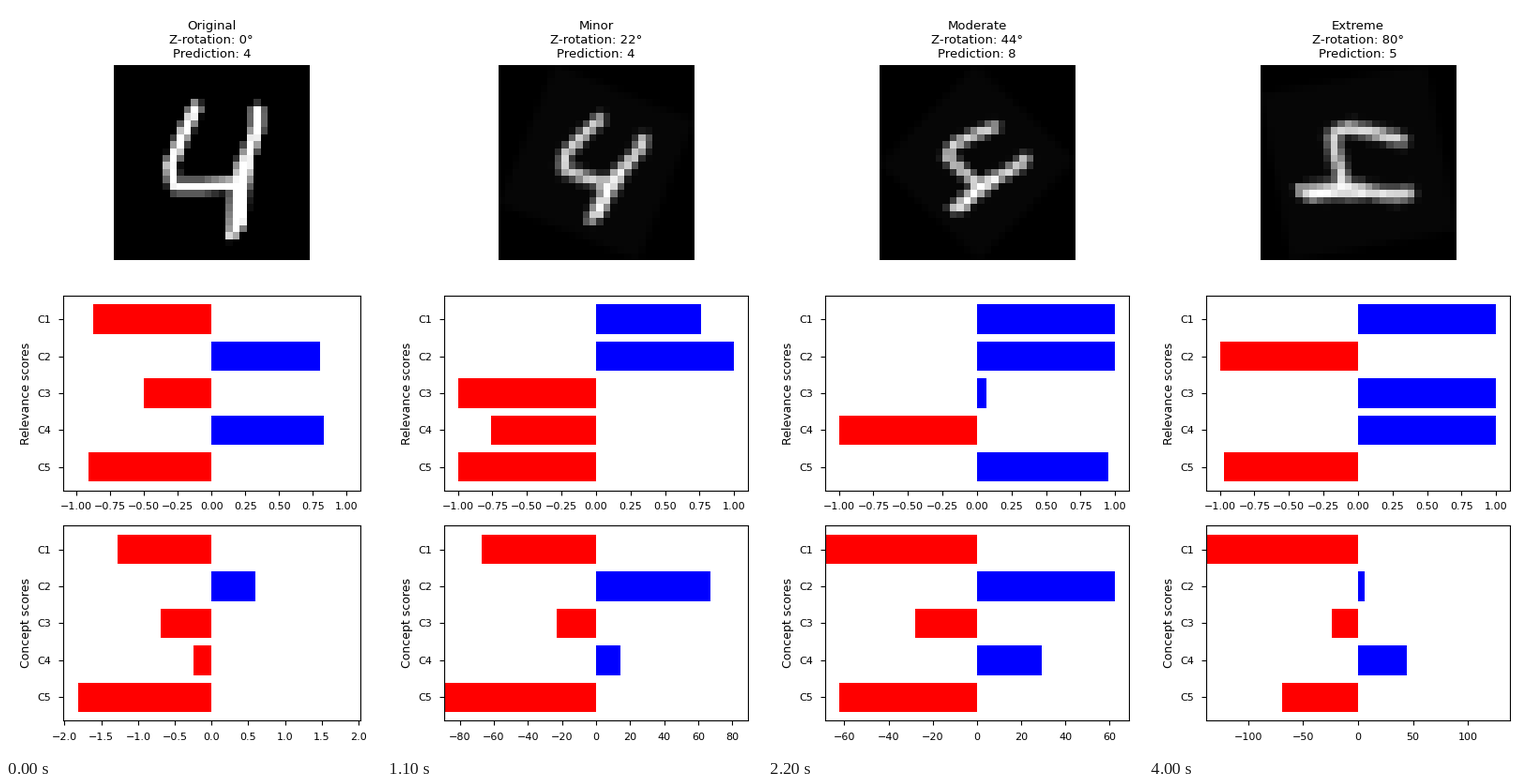
Write a matplotlib script that moves like this. It is 400 px wide and 800 px high and loops after 4100 ms.

```python
import numpy as np
import matplotlib.pyplot as plt
from matplotlib.animation import FuncAnimation

FRAMES, INTERVAL, STEP = 41, 100, 2
N = 28
SUB = 2
PAPER = 0.024
NAMES = [f"C{k}" for k in range(1, 6)]

# Pen strokes on the pixel grid: half width, then (column, row) points
STROKES = [
    (0.85, [(11.1, 5.8), (9.2, 10), (7.6, 14), (8, 16.3)]),
    (0.85, [(8.4, 17), (12, 17), (17, 16.6)]),
    (0.9, [(20, 6.2), (20, 8.5), (18.2, 14)]),
    (1.25, [(18.2, 14), (17.4, 18), (17.2, 22)]),
    (0.8, [(17.2, 22), (16.4, 23.8)]),
]


def segment_distance(x, y, a, b):
    dx, dy = b[0] - a[0], b[1] - a[1]
    t = np.clip(((x - a[0]) * dx + (y - a[1]) * dy) / (dx * dx + dy * dy), 0, 1)
    return np.hypot(x - a[0] - t * dx, y - a[1] - t * dy)


def draw_digit():
    y, x = np.mgrid[:N, :N]
    img = np.zeros((N, N))
    for half, pts in STROKES:
        for a, b in zip(pts, pts[1:]):
            img = np.maximum(img, half + 0.5 - segment_distance(x, y, a, b))
    return np.clip(img, 0, 1)


DIGIT = draw_digit()


def bilinear(img, x, y):
    """Sample img at fractional positions; everything outside is black."""
    padded = np.pad(img, 1)
    x = np.clip(x + 1, 0, N + 0.999)
    y = np.clip(y + 1, 0, N + 0.999)
    i, j = x.astype(int), y.astype(int)
    fx, fy = x - i, y - j
    top = padded[j, i] * (1 - fx) + padded[j, i + 1] * fx
    low = padded[j + 1, i] * (1 - fx) + padded[j + 1, i + 1] * fx
    return top * (1 - fy) + low * fy


def rotated(angle):
    """Turn the digit clockwise and shrink its bounding box back to N x N."""
    if angle == 0:
        return DIGIT
    c, s = np.cos(np.radians(angle)), np.sin(np.radians(angle))
    grid = ((np.arange(N * SUB) + 0.5) / SUB - N / 2) * (c + s)
    dx, dy = np.meshgrid(grid, grid)
    mid = (N - 1) / 2
    img = bilinear(np.maximum(DIGIT, PAPER), c * dx + s * dy + mid, c * dy - s * dx + mid)
    return img.reshape(N, SUB, N, SUB).mean(axis=(1, 3))


def ramp(v):
    return max(v, 0)


def bump(a, center, width):
    return np.exp(-((a - center) / width) ** 2 / 2)


def concept_scores(a):
    if a == 0:
        return np.array([-1.28, 0.6, -0.695, -0.245, -1.82])
    return np.array([
        -67.4 - 1.1 * ramp(a - 43) - 0.065 * ramp(a - 58.5) ** 2,
        67.1 - 0.0244 * ramp(a - 30) ** 2,
        -23.3 - 15 * bump(a, 58, 9),
        0.57 * a + 6.5 * bump(a, 37, 9) - 16.5 * bump(a, 63, 7),
        -51 - 0.82 * abs(a - 58) - 1.06 * ramp(30 - a),
    ])


def relevance_scores(a):
    """Each score saturates at +-1 and flips sign around certain angles."""
    if a == 0:
        return np.array([-0.875, 0.805, -0.505, 0.83, -0.91])
    scores = np.tanh([
        a - 21,
        63 - a,
        (a - 43.9) / 1.4,
        abs(a - 47.5) - 26.5,
        (17.7 - abs(a - 58)) / 2,
    ])
    scores[4] -= 0.09 * bump(a, 58, 4)
    return scores


def level(a):
    if a == 0:
        return "Original"
    return "Minor" if a <= 30 else "Moderate" if a <= 60 else "Extreme"


def prediction(a):
    return 4 if a <= 22 else 8 if a <= 62 else 0 if a <= 74 else 5


def bar_panel(ax, values, limit, label):
    ax.barh(NAMES, values, color=["blue" if v >= 0 else "red" for v in values])
    ax.set_xlim(-limit, limit)
    ax.invert_yaxis()
    ax.set_ylabel(label, fontsize=9)
    ax.tick_params(labelsize=8, pad=5.5)


fig = plt.figure(figsize=(4, 8), dpi=100)


def update(i):
    angle = STEP * i
    concepts = concept_scores(angle)
    fig.clear()
    top, mid, low = fig.subplots(3, 1)
    top.imshow(rotated(angle), cmap="gray")
    top.axis("off")
    top.set_title(f"{level(angle)}\nZ-rotation: {angle}°\nPrediction: {prediction(angle)}",
                  fontsize=9.5)
    bar_panel(mid, relevance_scores(angle), 1.1, "Relevance scores")
    bar_panel(low, concepts, np.abs(concepts).max() + 0.2, "Concept scores")
    fig.tight_layout()
    return []


anim = FuncAnimation(fig, update, frames=FRAMES, init_func=lambda: [],
                     interval=INTERVAL, repeat=True, repeat_delay=0)
plt.show()
```
